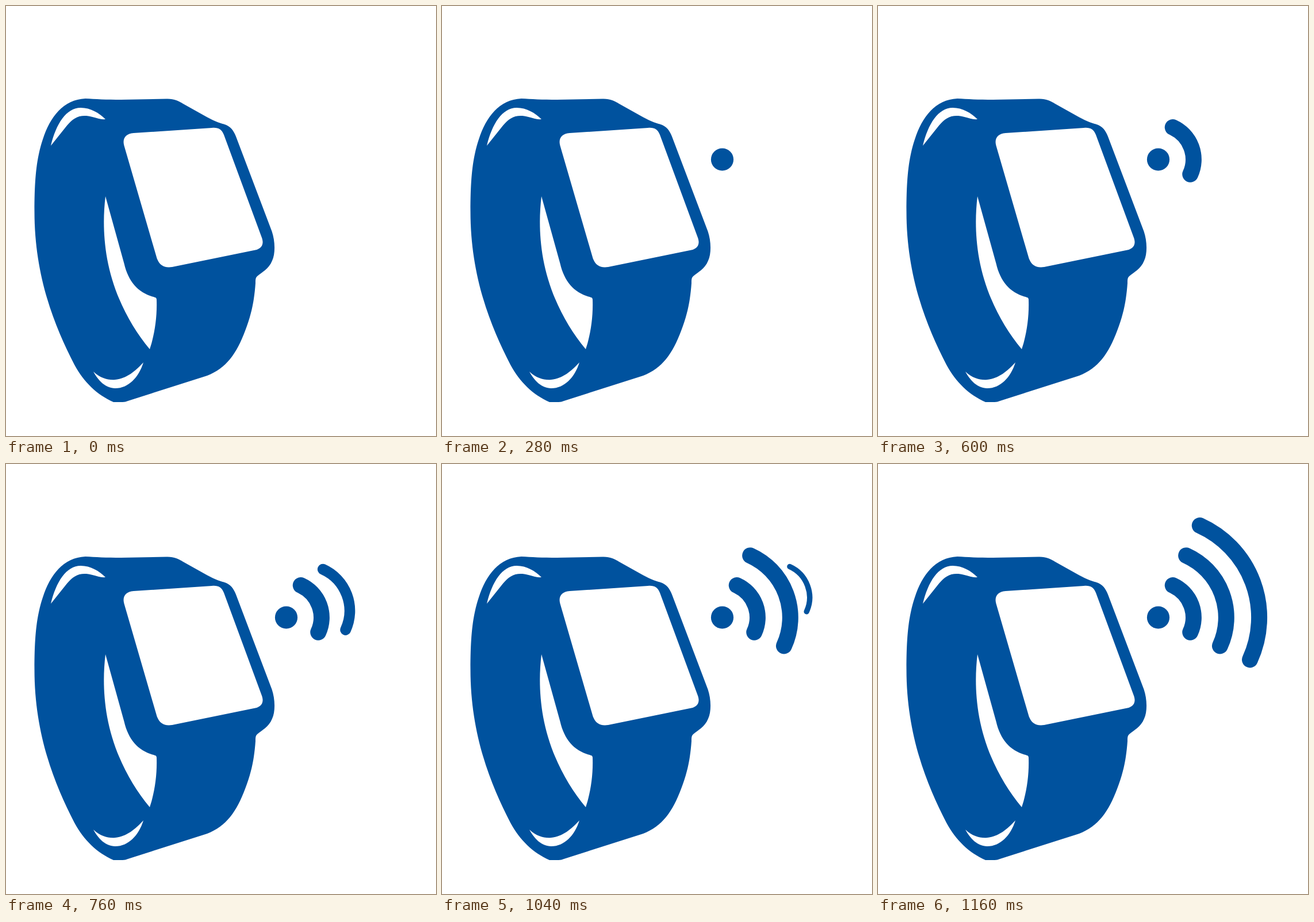
Write an HTML page that moves like this. It is 748 px wide and 748 px high and loops after 1.2 s.

```html
<!DOCTYPE html>
<html lang="en">
<head>
<meta charset="utf-8">
<title>Smartwatch signal</title>
<style>
  html, body { margin: 0; width: 100%; height: 100%; overflow: hidden; background: #fff; }
  svg { display: block; width: 100vw; height: 100vh; }
</style>
</head>
<body>
<svg viewBox="0 0 748 748" fill="#00529e">
  <path fill-rule="evenodd" d="
    M138 161C155 162 175 163 200 163L279 161.500C292 161 300 165 308 170L350 193.500C364 201 371 203.500 379 205.500
    C391 209 396 217 400 227L462.500 392C468 408 469 430 463 443C457 458 445 463 437 470C434 473 434 476 434 482
    C432 510 428 534 416 565C401 605 383 630 350 643L212 687Q208 689 203 689H187
    C158 676 136 655 119 624C84 556 49.500 470 49.500 357C49.500 300 53 265 64 232C77 192 100 163 138 161Z
    M222 221L358 212C369 211 375 214 379 224L445 403C449 414 445 421 436 424L289 454C275 456 267 451 262.500 439
    L205.500 243C202 231 208 222 222 221Z
    M78 243C87 205 105 177 130 177C147 177 162 186 173 197C163 198 155 193 140 191C125 190 116 196 106 208Z
    M173 331L205.500 448C213 480 230 499 258 506.500Q262 507 262 511C263 540 259 570 250 597
    C215 555 187 500 176 440C169 400 169 365 173 331Z
    M152 636C165 648 178 651 190 650C210 648 225 635 239 620C231 646 213 665 190 665C173 665 160 651 152 636Z"/>
  <g id="signal" stroke="#00529e" stroke-linecap="round"></g>
</svg>
<script>
const LOOP = 1200, STEP = 40, GROW = 280;
const CX = 487.5, CY = 267, WIDTH = 28;
const RAD = Math.PI / 180, AXIS = -20.5 * RAD, HALF = 45.2 * RAD;

// radius 0 is the dot; size is the full scale
const parts = [
  { start: 0, radius: 0, size: 1 },
  { start: 320, radius: 61.4, size: 1 },
  { start: 600, radius: 118.3, size: 1 },
  { start: 920, radius: 175.6, size: 1.017 }
];

const signal = document.getElementById("signal");
const polar = (r, a) => [CX + r * Math.cos(a), CY + r * Math.sin(a)];

function make(tag, attrs) {
  const el = document.createElementNS("http://www.w3.org/2000/svg", tag);
  for (const key in attrs) el.setAttribute(key, attrs[key]);
  return signal.appendChild(el);
}

for (const part of parts) {
  const r = part.radius;
  if (r) {
    // each arc grows from the middle of its tilted bounding box
    part.pivot = polar(r * (1 + Math.cos(HALF)) / 2, AXIS);
    part.el = make("path", {
      d: `M${polar(r, AXIS - HALF)}A${r} ${r} 0 0 1 ${polar(r, AXIS + HALF)}`,
      fill: "none", "stroke-width": WIDTH
    });
  } else {
    part.pivot = [CX, CY];
    part.el = make("circle", { cx: CX, cy: CY, r: 19.6, stroke: "none" });
  }
}

const clamp = u => Math.min(1, Math.max(0, u));
const rise = u => (2 * u) ** 2.7 / 2;
const ease = u => u < 0.5 ? rise(u) : 1 - rise(1 - u);

function draw(now) {
  const t = Math.floor((now % LOOP) / STEP) * STEP;
  for (const { el, start, pivot: [x, y], size } of parts) {
    const s = ease(clamp((t - start) / GROW)) * size;
    el.setAttribute("visibility", s > 0.02 ? "visible" : "hidden");
    el.setAttribute("transform", `translate(${x} ${y}) scale(${s}) translate(${-x} ${-y})`);
  }
}

let origin;
function tick(now) {
  origin ??= now;
  draw(now - origin);
  requestAnimationFrame(tick);
}
draw(0);
requestAnimationFrame(tick);
</script>
</body>
</html>
```
